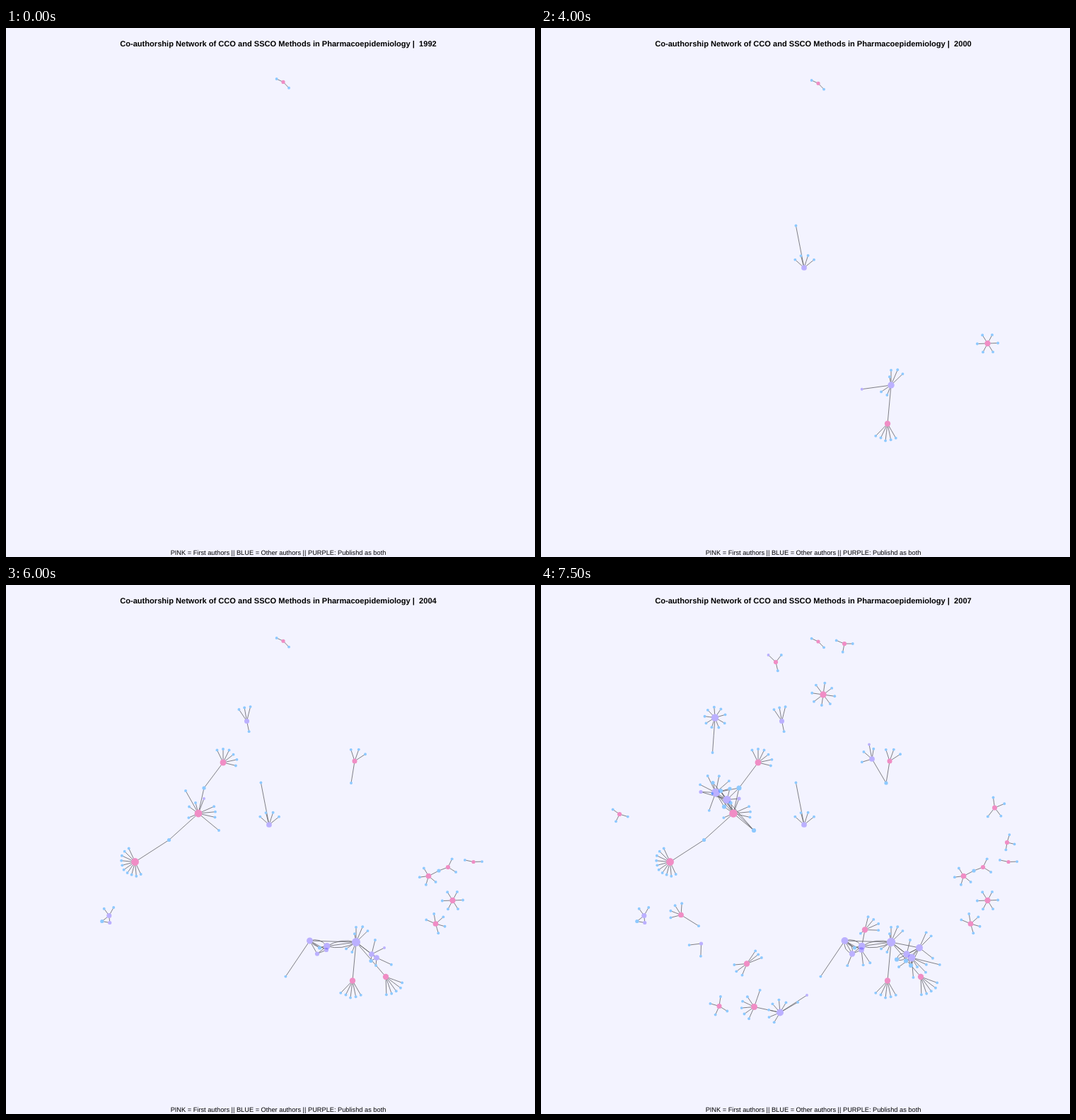
These frames come from a looping animation (748x748 px, 8 s). An HTML page with a canvas:

```html
<!DOCTYPE html>
<html lang="en">
<head>
<meta charset="utf-8">
<title>Co-authorship network</title>
<style>
  html, body { margin: 0; width: 100%; height: 100%; overflow: hidden; background: #f3f3ff; }
  body { position: relative; }
  canvas { position: absolute; left: 0; top: 0; width: 100%; height: 100%; }
  div {
    position: absolute; left: 0; width: 100%; box-sizing: border-box; padding-left: 22px;
    text-align: center; white-space: pre; line-height: 12px; color: #000;
    font-family: "Liberation Sans", Arial, sans-serif;
    font-kerning: none; text-rendering: geometricPrecision;
  }
  #title { top: 17px; font-size: 11.08px; font-weight: bold; }
  #key { top: 736px; font-size: 9.24px; }
</style>
</head>
<body>
<canvas id="stage"></canvas>
<div id="title"></div>
<div id="key">PINK = First authors || BLUE = Other authors || PURPLE: Publishd as both</div>
<script>
const SIZE = 748, FIRST = 1992, LAST = 2007, STEP = 500;
const PAPER = '#f3f3ff';
// inks are multiplied onto the paper, so overlaps deepen
const PINK = '#fc94c5', BLUE = '#94d3ff', PURPLE = '#c4b9ff';
const nodes = [], edges = [];

let seed = 7;
function random() {
  seed = (seed * 16807) % 2147483647;
  return seed / 2147483647;
}

function node(year, color, x, y) {
  const n = { year, color, x, y };
  nodes.push(n);
  return n;
}

// several strands between one pair fan out as bows
function link(year, a, b, strands = 1) {
  for (let i = 0; i < strands; i++) {
    const bow = strands > 1 ? (i / (strands - 1) - 0.5) * 18 : 0;
    edges.push({ year, a, b, bow });
  }
}

function join(year, hub, ...others) {
  for (const other of others) link(year, hub, other);
}

// spreads co-authors over an arc, angles in degrees
function leaves(year, hub, count, from, sweep, length) {
  const gaps = sweep === 360 ? count : Math.max(1, count - 1);
  for (let i = 0; i < count; i++) {
    const angle = (from + sweep * i / gaps) * Math.PI / 180;
    const reach = count > 1 ? length * (0.94 + 0.12 * random()) : length;
    link(year, hub, node(year, BLUE,
      hub.x + reach * Math.cos(angle), hub.y + reach * Math.sin(angle)));
  }
}

function star(year, color, x, y, count, from, sweep, length) {
  const hub = node(year, color, x, y);
  leaves(year, hub, count, from, sweep, length);
  return hub;
}

// small separate teams
star(1992, PINK, 392, 80, 2, -155, 201, 11);
star(1998, PINK, 631.5, 446, 6, -122, 360, 14.2);
star(2002, PINK, 661, 391.5, 2, -168, 166, 12);
star(2004, PINK, 607.5, 479, 5, -157, 231, 14);
star(2005, PINK, 399, 155, 8, 8, 360, 16);
star(2005, PURPLE, 226.5, 507, 2, 173, -81, 17);
star(2005, PINK, 252, 595.5, 4, 32, 246, 13);
star(2006, PINK, 111, 324, 3, 17, 198, 11.7);
star(2006, PINK, 659, 364, 3, -73, 172, 11);
star(2007, PINK, 641.5, 315, 4, -98, 226, 15);
star(2007, PINK, 429, 83, 3, 0, 202, 11.7);

const tall = star(1996, PURPLE, 372, 339, 4, -138, 99, 18);
leaves(1996, tall, 1, -101, 0, 60.6);
const kite = star(2002, PURPLE, 340.5, 192.5, 3, -124, 48, 20);
leaves(2002, kite, 1, 78, 0, 15);
const west = star(2006, PINK, 198, 466.5, 4, 165, 109, 16);
leaves(2006, west, 1, 32, 0, 29.5);
const north = star(2007, PURPLE, 246, 187.5, 9, 30, 314, 15);
leaves(2007, north, 1, 94, 0, 49.6);
const wings = star(2007, PINK, 291, 535.5, 3, -56, 34, 21.5);
leaves(2007, wings, 3, 112, 63, 17.5);
const top3 = star(2007, PINK, 332, 109, 2, -52, 129, 12.5);
join(2007, top3, node(2007, PURPLE, 321.5, 99));

// pairs of teams with a shared author
const bridge = node(2001, BLUE, 488, 280);
join(2001, bridge, star(2001, PINK, 493, 249, 3, -108, 75, 17));
const pair = star(2005, PURPLE, 468, 246, 3, 163, 116, 15);
join(2005, pair, bridge, node(2005, PURPLE, 464, 225.5));

const elbow = node(2001, BLUE, 612, 404);
join(2001, elbow, star(2001, PINK, 597.5, 411.5, 4, 40, 199, 13));
join(2003, elbow, star(2003, PINK, 625, 399, 2, -64, 96, 12.5));

const box = star(2003, PURPLE, 145.8, 467.5, 2, -126, 65, 12.7);
const boxLeft = node(2003, BLUE, 135.8, 475.5), boxRight = node(2003, PURPLE, 146.7, 477.5);
join(2003, box, boxLeft, boxRight);
link(2004, boxLeft, boxRight);

const south = star(2006, PURPLE, 338, 604.5, 6, 121, 180, 17);
leaves(2006, south, 1, -30, 0, 29);
join(2006, south, node(2006, PURPLE, 376, 580));
const mate = star(2007, PINK, 301.5, 596.5, 5, 114, 122, 18);
leaves(2007, mate, 1, -71, 0, 25);
link(2007, mate, south);

// western cluster
const wheel = star(2001, PINK, 272, 323, 3, -24, 37, 23);
leaves(2001, wheel, 1, 156, 0, 15);
const w1 = node(2001, BLUE, 254, 291), w2 = node(2001, BLUE, 280, 287);
const w3 = node(2001, PURPLE, 280, 302), w4 = node(2001, BLUE, 268, 308);
const w5 = node(2001, BLUE, 259, 313.5), w6 = node(2001, BLUE, 301, 347);
const joint = node(2001, BLUE, 230.5, 360.5);
join(2001, wheel, w1, w2, w3, w4, w5, w6, joint);
join(2001, joint, star(2001, PINK, 182.5, 391.5, 10, -115, -180, 20));
join(2004, w2, star(2004, PINK, 307, 251, 6, -116, 130, 19));
const inner = star(2005, PURPLE, 263, 303.5, 1, -158, 0, 22.6);
const w7 = node(2005, PURPLE, 226, 292.5), w8 = node(2005, BLUE, 243, 279.5);
const w9 = node(2005, BLUE, 267, 288);
join(2005, inner, wheel, w1, w2, w3, w4, w5, w6, w7, w8, w9);
const outer = star(2007, PURPLE, 247, 293.5, 4, -153, 112, 25);
leaves(2007, outer, 1, 110, 0, 27);
join(2007, outer, inner, wheel, w1, w2, w5, w6, w7, w8, w9);

// southern cluster
const core = star(1995, PURPLE, 495, 505, 3, -90, 46, 22.5);
leaves(1995, core, 1, -100, 0, 12);
leaves(1995, core, 2, 146, -34, 16);
const second = node(1995, PURPLE, 453.7, 510.7);
link(1995, core, second);
join(1999, core, star(1999, PINK, 490, 559.5, 5, 134, -74, 23));
join(2001, core, star(2001, PINK, 537, 554, 5, 88, -68, 26));

const third = star(2001, PURPLE, 429.5, 503, 1, 124, 0, 61);
const low = node(2001, PURPLE, 440, 521.5), under = node(2001, PURPLE, 453, 516);
const dip = node(2001, BLUE, 443.5, 513);
join(2001, third, core, low, under, dip);
join(2001, second, low, under, dip);
link(2001, under, low);
link(2001, third, second, 2);
link(2001, second, core, 2);

const p = star(2003, PURPLE, 517, 522, 1, -76, 0, 20.6);
const q = star(2003, PURPLE, 524, 527, 1, 25, 0, 23);
const arm = node(2003, PURPLE, 535, 513);
const s1 = node(2003, BLUE, 516, 531.5), s2 = node(2003, BLUE, 523, 538);
join(2003, p, core, q, arm, s1);
join(2003, q, core, s1, s2);

const s3 = node(2005, BLUE, 503, 529.5), s4 = node(2005, BLUE, 506, 540);
const s5 = node(2005, BLUE, 532, 540);
leaves(2005, arm, 2, -66, 21, 23);
leaves(2005, arm, 1, 38, 0, 24);
join(2005, arm, core, q, s1, s2, s3);
leaves(2005, q, 2, 46, 39, 28);
leaves(2005, q, 1, 14, 0, 41);
join(2005, q, s4, s5);
link(2005, p, s3, 2);
join(2005, p, s2);

const crown = star(2006, PINK, 458, 487.5, 4, -76, 78, 20);
leaves(2006, crown, 1, 140, 0, 8);
link(2006, crown, second);
leaves(2007, low, 1, 112, 0, 18);
leaves(2007, under, 2, 83, -27, 21);
link(2007, third, low, 2);

const canvas = document.getElementById('stage');
const title = document.getElementById('title');
const ctx = canvas.getContext('2d');
const scale = window.devicePixelRatio || 1;
canvas.width = canvas.height = SIZE * scale;
ctx.scale(scale, scale);

function draw(year) {
  const live = nodes.filter(n => n.year <= year);
  const lines = edges.filter(e => e.year <= year);
  // the layout settles downwards near its top edge
  const settle = y => y - 0.24 * (LAST - year) * Math.min(1, Math.max(0, (180 - y) / 90));

  title.textContent =
    'Co-authorship Network of CCO and SSCO Methods in Pharmacoepidemiology |  ' + year;
  ctx.globalCompositeOperation = 'source-over';
  ctx.fillStyle = PAPER;
  ctx.fillRect(0, 0, SIZE, SIZE);

  for (const n of live) n.degree = 0;
  ctx.strokeStyle = '#58585c';
  ctx.lineWidth = 0.75;
  for (const { a, b, bow } of lines) {
    a.degree++;
    b.degree++;
    const y1 = settle(a.y), y2 = settle(b.y);
    const dx = b.x - a.x, dy = y2 - y1, len = Math.hypot(dx, dy);
    ctx.beginPath();
    ctx.moveTo(a.x, y1);
    ctx.quadraticCurveTo(
      a.x + dx / 2 - dy / len * bow, y1 + dy / 2 + dx / len * bow, b.x, y2);
    ctx.stroke();
  }

  const disc = (n, color) => {
    ctx.fillStyle = color;
    ctx.beginPath();
    ctx.arc(n.x, settle(n.y), 1.93 * n.degree ** 0.43, 0, Math.PI * 2);
    ctx.fill();
  };
  for (const n of live) disc(n, PAPER);
  ctx.globalCompositeOperation = 'multiply';
  for (const n of live) disc(n, n.color);
}

let shown = 0;
const start = performance.now();
function tick() {
  const step = Math.floor((performance.now() - start) / STEP);
  const year = FIRST + step % (LAST - FIRST + 1);
  if (year !== shown) draw(shown = year);
  requestAnimationFrame(tick);
}
tick();
</script>
</body>
</html>
```
